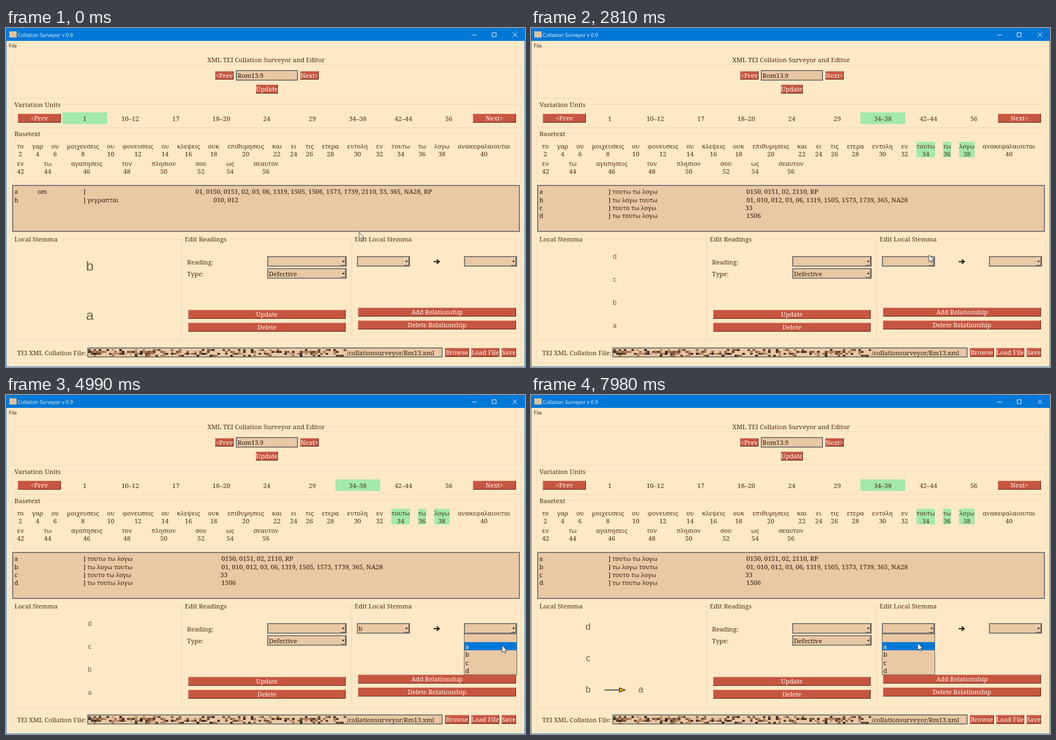
An HTML page that plays this animation: 926x605 px, repeating every 8 s.

```html
<!DOCTYPE html>
<html lang="en">
<head>
<meta charset="utf-8">
<title>Collation Surveyor</title>
<style>
  html, body { margin: 0; width: 100%; height: 100%; overflow: hidden; background: #ffe8c6; }
  svg { display: block; width: 100%; height: 100%; }
  text { font: 11.3px "Noto Serif", serif; fill: #4b3013; white-space: pre; }
  .num { font-size: 11.52px; }
  .dark { fill: #2e1c0d; }
  .light { fill: #fff6ea; }
  .ui { font: 9px "Open Sans", sans-serif; }
  .node { font-family: "Liberation Sans", Arial, sans-serif; fill: #755d49; text-anchor: middle; }
  .mid { text-anchor: middle; }
  .legend { font-size: 11.5px; stroke: #ffe8c6; stroke-width: 5px; paint-order: stroke; }
</style>
</head>
<body>
<svg id="stage" viewBox="0 0 926 605"></svg>
<script>
const LOOP = 8000;
const FIELD = '#e9c8a4', GREY = '#7d7b78', GREEN = '#a3e9a9', BLUE = '#0078d7';
const LIT = '#ffffff44', SHADE = '#2a0a06a8';
const stage = document.getElementById('stage');

function el(tag, attrs = {}, parent = stage) {
  const node = document.createElementNS('http://www.w3.org/2000/svg', tag);
  for (const key in attrs) node.setAttribute(key, attrs[key]);
  return parent.appendChild(node);
}
const rect = (x, y, width, height, fill, parent) => el('rect', { x, y, width, height, fill }, parent);
const line = (d, stroke, width = 1, parent) =>
  el('path', { d, stroke, 'stroke-width': width, fill: 'none' }, parent);
function text(x, y, string, cls = '', parent = stage) {
  const node = el('text', { x, y, class: cls }, parent);
  node.textContent = string;
  return node;
}
const widthOf = node => node.getComputedTextLength();
const show = (node, on) => node.setAttribute('visibility', on ? 'visible' : 'hidden');

function group(x, y, w, h, label) {
  el('rect', { x: x + .5, y: y + .5, width: w, height: h, fill: 'none', stroke: '#ebdcc0' });
  if (label) text(x + 5, y + 4.6, label, 'legend');
}
function field(x, y, w, h) {
  el('rect', { x: x + 1, y: y + 1, width: w - 2, height: h - 2, fill: FIELD, stroke: GREY, 'stroke-width': 2 });
}
function button(x, y, w, h, label) {
  rect(x, y, w, h, '#c75640');
  const topLeft = line(`M${x + .5} ${y + h}V${y + .5}H${x + w}`, LIT);
  const bottomRight = line(`M${x} ${y + h - .5}H${x + w - .5}V${y}`, SHADE);
  const caption = text(x + w / 2, y + h / 2 + 4.4, label, 'mid light');
  return down => {
    topLeft.setAttribute('stroke', down ? SHADE : LIT);
    bottomRight.setAttribute('stroke', down ? LIT : SHADE);
    caption.setAttribute('transform', down ? 'translate(.8 .8)' : '');
  };
}
function combo(x, y, w, value = '') {
  const right = x + w - 2;
  field(x, y, w, 19);
  line(`M${right - 8.5} ${y + 17}V${y + 2.5}H${right}`, LIT);
  line(`M${right - 9} ${y + 16.5}H${right - .5}V${y + 2}`, '#5f5347');
  el('path', { d: `M${right - 6.6} ${y + 8.5}h4.6l-2.3 2.7z`, fill: '#1d130b' });
  return text(x + 3, y + 14, value, 'dark');
}

// Window frame and menu
el('rect', { x: .5, y: .5, width: 925, height: 604, fill: 'none', stroke: '#3b8fd0' });
rect(0, 0, 926, 23, BLUE);
rect(6, 6, 13, 11, '#dcc39c');
text(21, 15.5, 'Collation Surveyor v 0.9', 'ui light');
line('M832 12.5h8M867.5 8.5h7v7h-7zM904 8l8 8M912 8l-8 8', '#e8f2fb');
text(5, 35, 'File', 'ui dark');

// Verse selection
text(464, 60.8, 'XML TEI Collation Surveyor and Editor', 'mid');
group(10, 65, 908, 60);
button(373, 77, 33, 15, '<Prev');
field(410, 75, 111, 19);
text(413, 89, 'Rom13.9', 'dark');
button(525, 77, 33, 15, 'Next>');
button(446, 101, 39, 16, 'Update');

group(10, 136, 908, 41, 'Variation Units');
group(10, 188, 908, 85, 'Basetext');
field(11, 280, 906, 84);
group(10, 376, 302, 180, 'Local Stemma');

// Base text: words spread evenly over the line, numbered by twos
const marks = el('g');
const words = [];
function wordLine(list, left, right, y) {
  const cells = list.split(' ').map(word => {
    const number = 2 * words.length + 2;
    const labels = [text(0, y, word, 'mid'), text(0, y + 13.9, number, 'mid num')];
    const cell = { number, labels, width: Math.max(...labels.map(widthOf)) };
    words.push(cell);
    return cell;
  });
  const used = cells.reduce((sum, cell) => sum + cell.width, 0);
  const gap = (right - left - used) / (cells.length - 1);
  let x = left;
  for (const cell of cells) {
    cell.x = x;
    cell.labels.forEach(label => label.setAttribute('x', x + cell.width / 2));
    x += cell.width + gap;
  }
}
wordLine('το γαρ ου μοιχευσεις ου φονευσεις ου κλεψεις ουκ επιθυμησεις και ει τις ετερα εντολη εν τουτω τω λογω ανακεφαλαιουται',
  19.5, 899.5, 215);
wordLine('εν τω αγαπησεις τον πλησιον σου ως σεαυτον', 19.5, 486, 246.4);

// Readings with their witnesses; '*' takes every witness not named by another reading
const ALL = '01, 010, 012, 0150, 0151, 02, 03, 06, 1319, 1505, 1506, 1573, 1739, 2110, 33, 365, NA28, RP'.split(', ');
const units = [
  ['1', { '': '*', 'γεγραπται': '010, 012' }],
  ['10–12', { 'ου φονευσεις': '*', '': '1739' }],
  ['17', { '': '*', 'ου ψευδομαρτυρησεις': '01, 0150, 1506, 2110, 365, RP' }],
  ['18–20', { 'ουκ επιθυμησεις': '*', '': '2110, 365' }],
  ['24', { 'ει': '*', 'η': '0150, 1506, 2110' }],
  ['29', { '': '*', 'εστιν': '010, 012, 365' }],
  ['34–38', {
    'τουτω τω λογω': '0150, 0151, 02, 2110, RP',
    'τω λογω τουτω': '*',
    'τουτο τω λογω': '33',
    'τω τουτω λογω': '1506'
  }],
  ['42–44', {}], ['56', {}]
];
const LAST_UNIT = 6;

function unitView(label, readings, x) {
  const view = el('g', {}, marks);
  rect(x - 40, 150.6, 80, 20.7, GREEN, view);
  const [from, to = from] = label.split('–').map(Number);
  words.filter(({ number }) => number >= from && number <= to)
    .forEach(cell => rect(cell.x, 203, cell.width, 28, GREEN, view));

  const named = Object.values(readings).join(', ').split(', ');
  const rest = ALL.filter(witness => !named.includes(witness)).join(', ');
  Object.entries(readings).forEach(([reading, witnesses], row) => {
    const y = 296.2 + 14.4 * row;
    text(15, y, 'abcd'[row], 'dark', view);
    if (!reading) text(56, y, 'om', 'dark', view);
    text(138, y, ']', 'dark', view);
    const shown = text(145, y, reading, 'dark', view);
    // The reading column is padded with one narrow space per missing letter.
    const column = 338 + (reading && widthOf(shown) - 2.64 * reading.length);
    text(column, y, witnesses === '*' ? rest : witnesses, 'dark num', view);
  });
  return view;
}
const views = units.map(([label, readings], i) => {
  const x = 140.5 + 81.2 * i;
  text(x, 165.6, label, 'mid num');
  return unitView(label, readings, x);
});
button(21, 153, 77, 16, '<Prev');
const pressNext = button(833, 153, 77, 16, 'Next>');

// Stemma drawings
function stemma(size, letters, x, top, step) {
  const g = el('g', { style: `--size:${size}px` });
  [...letters].forEach((letter, i) => text(x, top + step * i, letter, 'node', g));
  g.querySelectorAll('text').forEach(node => { node.style.fontSize = size + 'px'; });
  return g;
}
const pairStemma = stemma(24.5, 'ba', 149.5, 433, 88);
const listStemma = stemma(12, 'dcba', 149.3, 411.8, 41.2);
const linkStemma = stemma(16, 'dcb', 102, 418.5, 56);
linkStemma.append(stemma(16, 'a', 196, 530.5, 0));
line('M131 526.5H158', '#111', 1.3, linkStemma);
el('path', { d: 'M157.5 522.5L168.5 526.5 157.5 530.5Z', fill: '#f0a010', stroke: '#111' }, linkStemma);

// Editing panels
group(314, 376, 301, 180, 'Edit Readings');
text(323, 421.8, 'Reading:');
text(323, 443, 'Type:');
combo(466, 407, 142);
combo(466, 428.5, 142, 'Defective');
button(325, 503, 281, 16, 'Update');
button(325, 526, 281, 16, 'Delete');

group(617, 376, 301, 180, 'Edit Local Stemma');
const fromValue = combo(626, 407, 95);
const toValue = combo(817, 407, 95);
el('path', { d: 'M763 416h6.5l-1.8-3.2h1.8l5 4.2-5 4.2h-1.8l1.8-3.2H763z', fill: '#2a1c10' });
const pressAdd = button(628, 499, 282, 16, 'Add Relationship');
button(628, 522, 282, 16, 'Delete Relationship');

// File row with a pixelated path
group(10, 559, 908, 38);
text(20, 583.7, 'TEI XML Collation File:');
field(145, 570, 634, 18);
let seed = 11;
const random = () => (seed = (seed * 16807) % 2147483647) / 2147483647;
for (let i = 0; i < 400; i++) {
  const col = i >> 2, row = i & 3;
  const ink = .1 + .55 * Math.sin(Math.PI * (row + .5) / 4);
  if (random() < ink) {
    rect(147 + col * 4.6, 573 + row * 3.4, 4.6, 3.4, `hsl(25 35% ${10 + 55 * random()}%)`);
  }
}
text(608, 583.7, '/collationsurveyor/Rm13.xml', 'dark');
button(783, 571, 43, 16, 'Browse');
button(830, 571, 50, 16, 'Load File');
button(884, 571, 26, 16, 'Save');

// Drop-down list
const ROW = 14.5, LIST_Y = 426.5;
const popup = el('g');
el('rect', { x: .5, y: LIST_Y, width: 94, height: 5 * ROW, fill: FIELD, stroke: '#6f665c' }, popup);
const hover = rect(1, 0, 93, ROW, BLUE, popup);
const options = [...' abcd'].map((letter, i) => text(2.5, LIST_Y + ROW * i + 11.7, letter, 'dark', popup));

// Pointer
const pointer = el('g');
const halo = el('circle', { cx: .3, cy: .8, r: 9.6, fill: '#f0c800', 'fill-opacity': .78 }, pointer);
el('path', {
  d: 'M0 0V12.4L2.9 9.8 4.8 14 6.8 13.1 5 9H8.9Z',
  fill: '#fff', stroke: '#222', 'stroke-width': .8, 'stroke-linejoin': 'round'
}, pointer);

// Timeline: pointer moves as [start, duration, x, y]
const home = [630, 365];
const moves = [
  [20, 900, 868, 157],
  [2510, 300, 710, 405],
  [2810, 150, 713, 418],
  [3010, 380, 688, 464],
  [3990, 450, 905, 418],
  [4590, 400, 885, 447],
  [5390, 500, 806, 506],
  [6880, 600, 713, 424],
  [7680, 300, 690, 443]
];
const popups = [[3010, 3610, 626], [4590, 5390, 817], [7680, LOOP, 626]];
const PRESS = 80, NEXT_START = 910, NEXT_PERIOD = 200;
const ADD_DOWN = 6050, ADD_UP = 6200;
const during = (t, start, end) => t >= start && t < end;
const clamp = (value, low, high) => Math.min(high, Math.max(low, value));
const ease = k => k * k * (3 - 2 * k);

function pointerAt(t) {
  return moves.reduce(([px, py], [start, duration, x, y]) => {
    const k = ease(clamp((t - start) / duration, 0, 1));
    return [px + (x - px) * k, py + (y - py) * k];
  }, home);
}

function render(now) {
  const t = now % LOOP;
  const [x, y] = pointerAt(t);

  // Next is clicked at a steady pace and acts on release.
  const clicks = (t - NEXT_START) / NEXT_PERIOD;
  const unit = clamp(Math.floor(clicks), 0, LAST_UNIT);
  const nextDown = clicks > 0 && clicks < LAST_UNIT && clicks % 1 > 1 - PRESS / NEXT_PERIOD;
  const addDown = during(t, ADD_DOWN, ADD_UP);
  const linked = t >= ADD_UP;
  const listClick = popups.some(([open, close]) =>
    during(t, open - PRESS, open) || (close < LOOP && during(t, close - PRESS, close)));

  views.forEach((view, i) => show(view, i === unit));
  show(pairStemma, unit < LAST_UNIT);
  show(listStemma, unit === LAST_UNIT && !linked);
  show(linkStemma, linked);
  fromValue.textContent = t >= popups[0][1] && !linked ? 'b' : '';
  toValue.textContent = t >= popups[1][1] && !linked ? 'a' : '';
  pressNext(nextDown);
  pressAdd(addDown);

  const list = popups.find(([open, close]) => during(t, open, close));
  show(popup, list);
  if (list) {
    const row = clamp(Math.floor((y - LIST_Y) / ROW), 0, 4);
    popup.setAttribute('transform', `translate(${list[2]} 0)`);
    hover.setAttribute('y', LIST_Y + row * ROW);
    options.forEach((option, i) => option.setAttribute('class', i === row ? 'light' : 'dark'));
  }

  pointer.setAttribute('transform', `translate(${x} ${y})`);
  show(halo, nextDown || addDown || listClick);
}

let origin;
function tick(now) {
  origin ??= now;
  render(now - origin);
  requestAnimationFrame(tick);
}
render(0);
requestAnimationFrame(tick);
</script>
</body>
</html>
```
